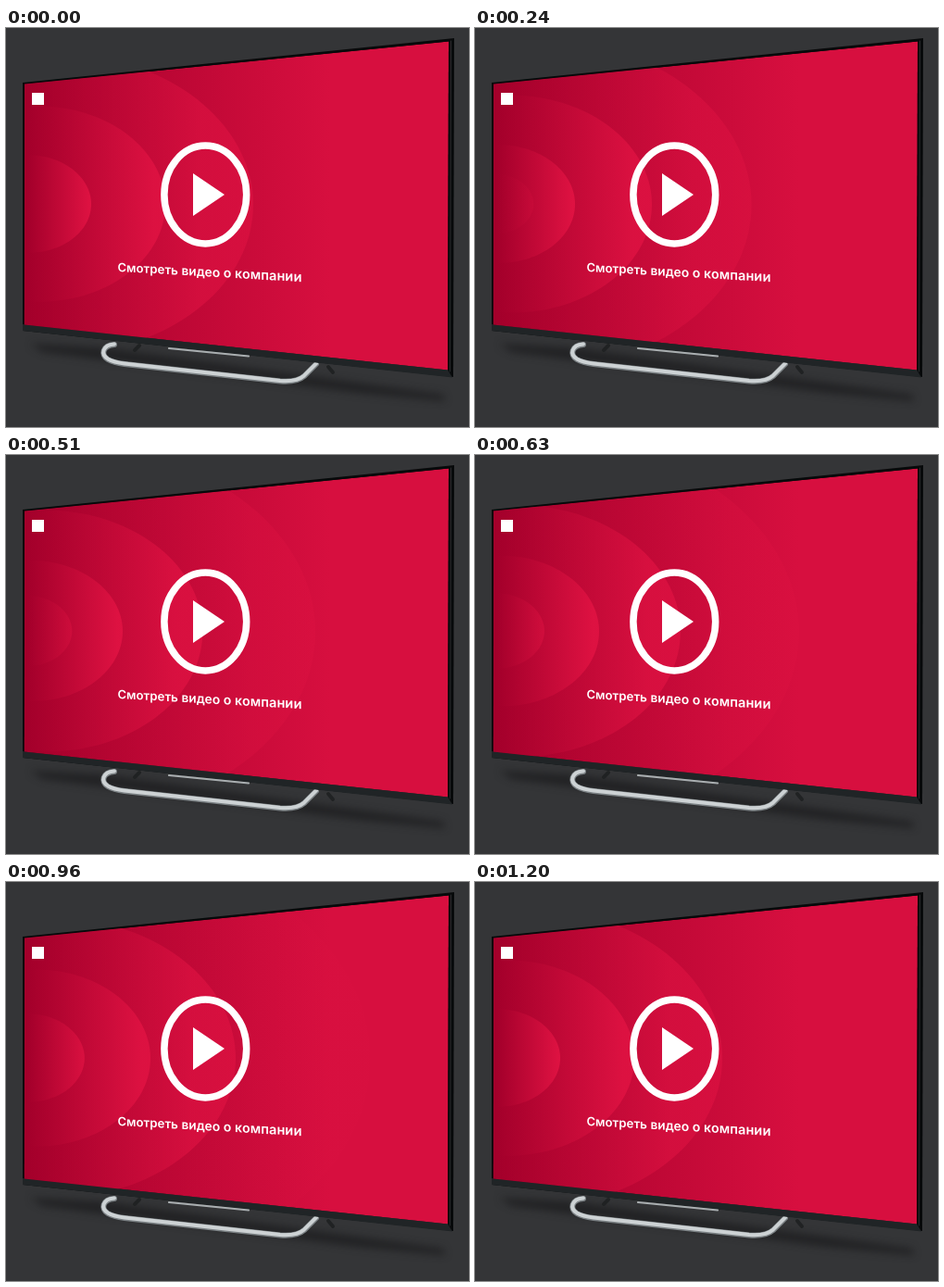
Write an HTML page with a canvas that moves like this. It is 500x431 px and loops after 1230 ms.

```html
<!DOCTYPE html>
<html lang="ru">
<head>
<meta charset="utf-8">
<style>
  html, body { margin: 0; width: 100%; height: 100%; overflow: hidden; background: #343537; }
  canvas { display: block; }
</style>
</head>
<body>
<canvas id="stage" width="500" height="431"></canvas>
<script>
const ctx = document.getElementById('stage').getContext('2d');
const STEP = 30, LOOP = 1230;

// Screen plane: left edge at x = 20, horizontals meet at (20 - DEPTH, HORIZON)
const LEFT = 20, DEPTH = 1258, HORIZON = 186;
const zoomAt = x => 1 + (x - LEFT) / DEPTH;
const project = (u, v) => {
  const zoom = 1 / (1 - u / DEPTH);
  return [LEFT + u * zoom, HORIZON + v * zoom];
};

// Each ring grows from one edge / full-brightness point / opacity to the next one
const EDGES = [56, 92, 172, 267, 425];
const BRIGHT = [56, 92, 160, 210, 330];
const OPACITY = [0, 1, 0.88, 0.6, 0];
const mix = (list, i, p) => list[i] + (list[i + 1] - list[i]) * p;

const SCREEN = [[20, 60.5], [478, 14.5], [477, 369.5], [19.5, 320.5]];

function trace(points) {
  ctx.beginPath();
  points.forEach(([x, y]) => ctx.lineTo(x, y));
  ctx.closePath();
}

function fill(points, style) {
  trace(points);
  ctx.fillStyle = style;
  ctx.fill();
}

function line(path, width, color) {
  ctx.lineWidth = width;
  ctx.strokeStyle = color;
  ctx.stroke(new Path2D(path));
}

function shade(to, bright) {
  const g = ctx.createLinearGradient(24, 0, to, 0);
  g.addColorStop(0, '#a4002b');
  g.addColorStop(1, bright);
  return g;
}

function drawBody() {
  ctx.fillStyle = '#343537';
  ctx.fillRect(0, 0, 500, 431);

  ctx.filter = 'blur(4px)';
  fill([[26, 341], [110, 346], [472, 396], [474, 403], [380, 394], [40, 350]], 'rgba(20,21,22,.6)');
  ctx.filter = 'none';

  ctx.lineCap = 'round';
  line('M144 343L139 348M348 366L353 372', 4, '#202223');
  const tube = 'M117 342C104 343 102 353 110 358Q116 361.5 128 363L296 381.5Q314 383 322 376L335 363';
  line(tube, 6, '#7c8285');
  ctx.save();
  ctx.translate(0, -0.6);
  line(tube, 4, '#cdd2d4');
  ctx.restore();

  fill([[18, 59], [484, 11], [483, 377], [18, 327]], '#07090a');
  fill([[18, 320], [477, 369], [482, 377.5], [18, 327]], '#202426');
  line('M480.5 14L479.5 371', 1, '#2a2d2f');
  line('M176 346L262 354.5', 2.2, '#a9aeb0');
}

function drawRing(edge, bright, alpha) {
  const d = edge - LEFT, radius = d / (1 + d / DEPTH), points = [];
  for (let i = 0; i <= 80; i++) {
    const a = (i / 80 - 0.5) * Math.PI;
    points.push(project(radius * Math.cos(a), 4 + radius / 1.29 * Math.sin(a)));
  }
  ctx.globalAlpha = alpha;
  fill(points, shade(bright, '#df1242'));
  ctx.globalAlpha = 1;
}

function drawScreen(p) {
  ctx.save();
  trace(SCREEN);
  ctx.clip();
  fill(SCREEN, shade(350, '#d70f3f'));
  for (let i = 3; i >= 0; i--) {
    drawRing(mix(EDGES, i, p), mix(BRIGHT, i, p), mix(OPACITY, i, p));
  }
  ctx.restore();
}

function drawLabel(text, x, v) {
  ctx.font = '600 12.05px Inter, "Open Sans", sans-serif';
  for (const letter of text) {
    const zoom = zoomAt(x);
    ctx.setTransform(zoom, v / DEPTH * zoom, 0, zoom, x, HORIZON + v * zoom);
    ctx.fillText(letter, 0, 0);
    x += ctx.measureText(letter).width * zoom;
  }
  ctx.resetTransform();
}

function drawOverlay() {
  ctx.beginPath();
  ctx.ellipse(215.3, 180, 44.4, 52.9, 0, 0, 2 * Math.PI);
  ctx.lineWidth = 7.5;
  ctx.strokeStyle = '#fff';
  ctx.stroke();
  fill([[202, 157], [236, 180], [202, 203]], '#fff');
  ctx.fillRect(28, 70, 13, 13);
  drawLabel('Смотреть видео о компании', 120.5, 71.2);
}

function frame(now) {
  const time = Math.floor(now % LOOP / STEP) * STEP;
  drawBody();
  drawScreen(time / (LOOP - STEP));
  drawOverlay();
  requestAnimationFrame(frame);
}
requestAnimationFrame(frame);
</script>
</body>
</html>
```
